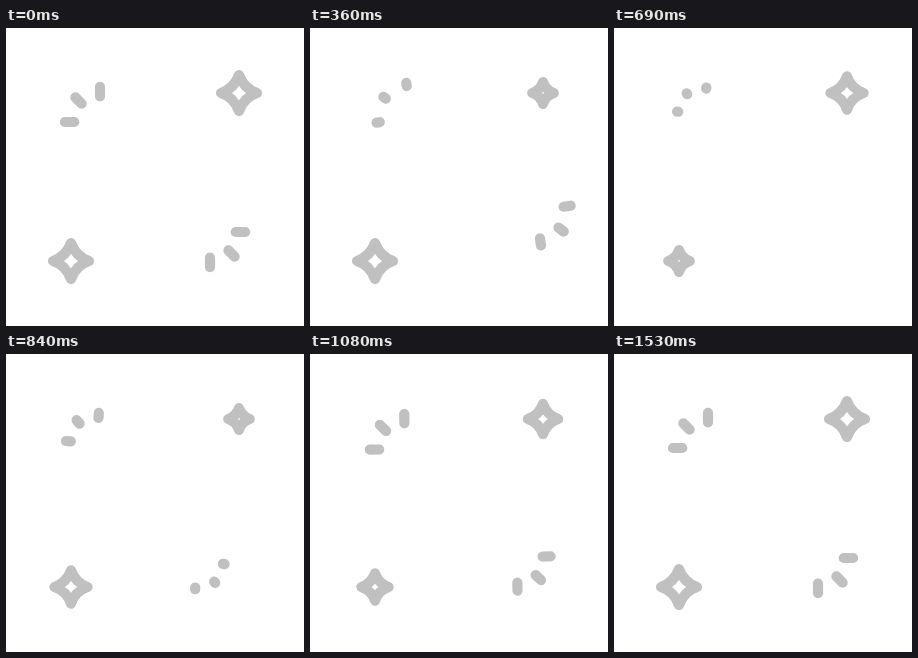
Animation, 298 px wide and 298 px high, one loop 1.8 s. Source, as an HTML page:

```html
<!DOCTYPE html>
<html lang="en">
<head>
<meta charset="utf-8">
<title>Sparkles</title>
<style>
  html, body { margin: 0; width: 100%; height: 100%; overflow: hidden; background: #fff; }
  svg { display: block; width: 100vw; height: 100vh; }
  path { fill: none; stroke: #c0c0c0; stroke-width: 10.2; stroke-linecap: round; stroke-linejoin: round; }
</style>
</head>
<body>
<svg viewBox="0 0 298 298">
  <g id="swing">
    <path id="raysA"/>
    <path id="raysB" transform="rotate(180 149 149)"/>
  </g>
  <path id="starA"/>
  <path id="starB"/>
</svg>
<script>
const STEP = 30, LOOP = 1800;
const $ = id => document.getElementById(id);
const swing = $('swing'), raysA = $('raysA'), raysB = $('raysB');
const starA = $('starA'), starB = $('starB');

// Cubic Bezier easing with end values 0 and 1, solved by bisection.
function bezier(x1, y1, x2, y2) {
  const at = (a, b, s) => 3 * (1 - s) ** 2 * s * a + 3 * (1 - s) * s * s * b + s ** 3;
  return x => {
    let lo = 0, hi = 1;
    for (let i = 0; i < 24; i++) {
      const mid = (lo + hi) / 2;
      if (at(x1, x2, mid) < x) lo = mid; else hi = mid;
    }
    return at(y1, y2, (lo + hi) / 2);
  };
}

const smooth = bezier(.33, 0, .67, 1);
const soft = bezier(.3, .1, .7, .9);
const settle = bezier(.4, 0, .3, 1);
const snap = bezier(.7, 0, .4, 1);

// Keys are [tick, value, easing towards this key].
function track(keys, t) {
  if (t <= keys[0][0]) return keys[0][1];
  for (let i = 1; i < keys.length; i++) {
    const [t0, v0] = keys[i - 1], [t1, v1, ease = smooth] = keys[i];
    if (t < t1) return v0 + (v1 - v0) * ease((t - t0) / (t1 - t0));
  }
  return keys[keys.length - 1][1];
}

const angle = [[4.5, 0], [14.5, -8.7, settle], [24.5, 5.8, snap], [38, -1.5], [51, 0]];
const hop = [[1, 0], [13, -12], [27, 0]];
const pulse = [[1, 1], [8, .6], [12, .6], [19, 1], [21, 1], [28, .6], [32, .6], [39, 1]];
const tail = [[4.5, 0], [16.5, 1, soft]];
const head = [[19.5, 0], [36, 1]];

// Each ray runs from its inner end to its outer end.
const rays = [
  [68.3, 94, 58.9, 94],
  [75.6, 75.6, 69.4, 69.4],
  [94, 68.3, 94, 58.9]
];

function rayPath(t) {
  const growing = t >= head[0][0];
  const from = growing ? 0 : track(tail, t);
  const to = growing ? track(head, t) : 1;
  if (to - from < .005) return '';
  return rays.map(([x0, y0, x1, y1]) => {
    const point = k => `${x0 + (x1 - x0) * k} ${y0 + (y1 - y0) * k}`;
    return `M${point(from)}L${point(to)}`;
  }).join('');
}

function starPath(cx, cy, scale) {
  const p = (x, y) => `${cx + x * scale} ${cy + y * scale}`;
  const r = 18, a = 3.2, b = 8.6;
  return `M${p(0, -r)}C${p(a, -b)} ${p(b, -a)} ${p(r, 0)}` +
    `C${p(b, a)} ${p(a, b)} ${p(0, r)}` +
    `C${p(-a, b)} ${p(-b, a)} ${p(-r, 0)}` +
    `C${p(-b, -a)} ${p(-a, -b)} ${p(0, -r)}Z`;
}

function draw(ms) {
  const t = Math.floor((ms % LOOP) / STEP + 1e-6);
  swing.setAttribute('transform', `translate(0 ${track(hop, t)}) rotate(${track(angle, t)} 149 47)`);
  raysA.setAttribute('d', rayPath(t));
  raysB.setAttribute('d', rayPath(t - 4));
  starA.setAttribute('d', starPath(233, 65, track(pulse, t)));
  starB.setAttribute('d', starPath(65, 233, track(pulse, t - 11)));
}

const start = performance.now();
function loop() {
  draw(performance.now() - start);
  requestAnimationFrame(loop);
}
draw(0);
requestAnimationFrame(loop);
</script>
</body>
</html>
```
